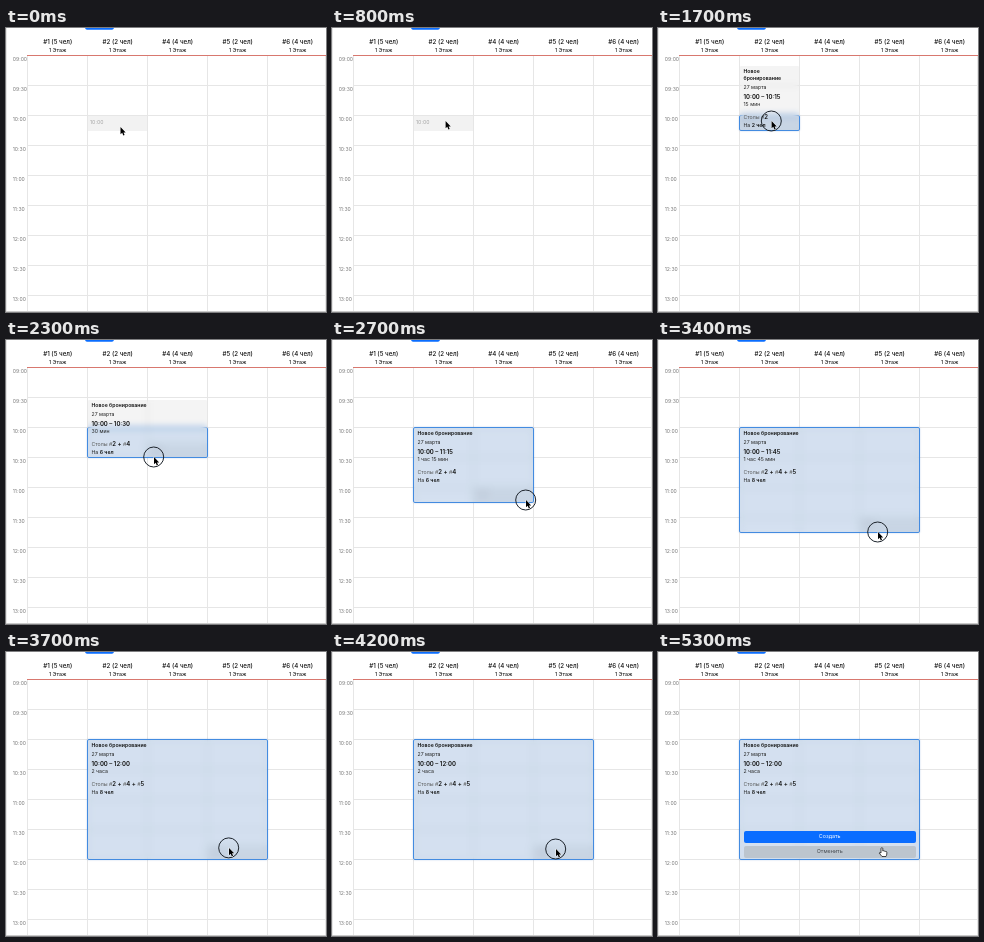
An HTML page that plays this animation: 320x284 px, repeating every 5900 ms.

```html
<!DOCTYPE html>
<html lang="ru">
<head>
<meta charset="utf-8">
<title>Бронирование столов</title>
<style>
  html, body { margin: 0; width: 100%; height: 100%; overflow: hidden; background: #fff; }
  body { position: relative; font: 5.2px Inter, Roboto, sans-serif; color: #222; }
  body > * { position: absolute; box-sizing: border-box; }
  svg { left: 0; top: 0; width: 320px; height: 284px; }
  b { font-weight: 600; color: #111; }
  #slot { width: 59px; height: 15px; padding: 2px 2px; line-height: 8px; background: rgba(0,0,0,.05); color: #a4a4a4; }
  #range { border: 1px solid #438be0; border-radius: 2px; background: rgba(0,105,220,.13);
    box-shadow: 0 0 1.5px rgba(0,80,180,.35); backdrop-filter: blur(3px); }
  #card { padding: 1.5px 3.5px 0; background: rgba(0,0,0,.045); border-radius: 1px; backdrop-filter: blur(3px); }
  #card div { white-space: nowrap; line-height: 9px; height: 9px; }
  #card .title { white-space: normal; line-height: 7px; height: auto; margin-bottom: 1px; font-weight: 600; color: #111; }
  #card .time { font-size: 6px; }
  #card .length { line-height: 7.5px; height: 11.5px; }
  #card .tables { color: #555; }
  #card .tables b { font-size: 6px; }
  .button { left: 85.5px; width: 172.5px; height: 11.5px; border-radius: 2px; text-align: center; line-height: 11.5px; font-size: 5.4px; }
  #create { top: 179.3px; background: #0a6dff; color: #fff; }
  #cancel { top: 194.3px; background: #bcc5ce; color: #454a50; }
</style>
</head>
<body>
<svg id="grid"></svg>
<div id="slot"></div>
<div id="range"></div>
<div id="card"></div>
<div id="create" class="button">Создать</div>
<div id="cancel" class="button">Отменить</div>
<svg>
  <g id="pointer">
    <circle id="press" cx="-.3" r="10" fill="none" stroke="#1c232b" stroke-width="1"/>
    <path d="M0 0V7.3L1.7 5.8 2.8 8.4 4.1 7.9 3 5.4H5.2Z" stroke="#fff" stroke-width=".8" paint-order="stroke"/>
  </g>
  <path id="hand" transform="translate(224 196)" fill="#fff" stroke="#111" stroke-width=".75" stroke-linejoin="round"
    d="M-1 .6Q-.9-.3-.1-.3T.8.6V3Q1.6 2.4 2.2 3.2 3 2.7 3.6 3.5 4.7 3.2 4.8 4.3V6Q4.7 7.3 4 8.5H0Q-1 7.3-2.8 5.1-2.7 3.9-1 5Z"/>
</svg>
<script>
const LOOP = 5900, STEP = 100, PRESS = 1700, RELEASE = 4800;
const LEFT = 21, COL = 60, TOP = 27, SLOT = 15, START = 87, CARD = 58;
const tables = [[1, 5], [2, 2], [4, 4], [5, 2], [6, 4]];
// time, x, y
const path = [
  [0, 114.5, 99], [600, 113.6, 93], [2000, 113.6, 93], [2100, 121, 98], [2300, 148, 117],
  [2600, 187, 149.8], [2700, 194, 160], [3000, 208, 178], [3200, 215, 187], [3400, 220, 192],
  [3600, 222.5, 195.2], [3800, 223.5, 196.6], [4200, 224, 197], [LOOP, 224, 197]
];
const $ = id => document.getElementById(id);
const show = (id, on) => { $(id).style.visibility = on ? 'visible' : 'hidden'; };
const place = (id, box) => {
  for (const key in box) $(id).style[key] = box[key] + 'px';
};
const clock = y => {
  const minutes = 540 + y - TOP;
  return String(Math.floor(minutes / 60)).padStart(2, '0') + ':' + String(minutes % 60).padStart(2, '0');
};

function drawGrid() {
  const line = (x, y, w, h, color) => `<rect x="${x}" y="${y}" width="${w}" height="${h}" fill="${color}"/>`;
  const text = (x, y, size, color, value, more = '') =>
    `<text x="${x}" y="${y}" font-size="${size}" fill="${color}" ${more}>${value}</text>`;
  let out = line(0, 0, 1, 284, '#e6e6e6') + line(319, 28, 1, 256, '#e6e6e6');
  for (let i = 0; i < 9; i++) {
    const y = TOP + i * 30;
    if (i) out += line(LEFT, y, 299, 1, '#e6e6e6');
    out += text(6.8, y + 6, 5.1, '#777', clock(y));
  }
  tables.forEach(([number, seats], i) => {
    const x = LEFT + i * COL, middle = x + 30.7;
    out += line(x, TOP, 1, 257, '#e6e6e6');
    out += text(middle, 15.8, 6.2, '#111', `#${number} (${seats} чел)`, 'text-anchor="middle" font-weight="500"');
    out += text(middle, 24, 5.3, '#222', '1 Этаж', 'text-anchor="middle" font-weight="500"');
  });
  out += line(LEFT, TOP, 299, 1, '#d8786f') + line(0, 283, 320, 1, '#c9c9c9');
  out += '<path d="M79 0H108Q107.5 1.7 106 1.7H81Q79.5 1.7 79 0Z" fill="#0a6dff"/>';
  $('grid').innerHTML = out;
}

function pointerAt(t) {
  const i = path.findIndex(point => point[0] > t);
  const [t0, x0, y0] = path[i - 1], [t1, x1, y1] = path[i];
  const k = (t - t0) / (t1 - t0);
  return [x0 + (x1 - x0) * k, y0 + (y1 - y0) * k];
}

function duration(minutes) {
  const hours = Math.floor(minutes / 60), rest = minutes % 60;
  const parts = [];
  if (hours) parts.push(hours + (hours > 1 ? ' часа' : ' час'));
  if (rest) parts.push(rest + ' мин');
  return parts.join(' ');
}

let lastCard = '';
function drawBooking(column, end) {
  const chosen = tables.slice(1, column + 1);
  const width = chosen.length * COL + 1, height = end - START;
  const cardHeight = Math.max(height - 1, CARD + (column === 1 ? 7 : 0) - 1);
  place('range', { left: LEFT + COL, top: START, width, height: height + 1 });
  place('card', { left: LEFT + COL + 1, top: end - cardHeight, width: width - 2, height: cardHeight });
  const seats = chosen.reduce((sum, table) => sum + table[1], 0);
  const names = chosen.map(table => `#<b>${table[0]}</b>`).join(' <b>+</b> ');
  const html = `<div class="title">Новое бронирование</div><div>27 марта</div>
    <div class="time"><b>${clock(START)} – ${clock(end)}</b></div>
    <div class="length">${duration(height)}</div>
    <div class="tables">Столы ${names}</div><div>На <b>${seats} чел</b></div>`;
  if (html !== lastCard) $('card').innerHTML = lastCard = html;
}

function draw(time) {
  const t = Math.floor(time % LOOP / STEP) * STEP;
  const [x, y] = pointerAt(t);
  const column = Math.floor((x - LEFT) / COL);
  const slotTop = TOP + Math.floor((y - 3 - TOP) / SLOT) * SLOT;
  const booking = t >= PRESS, done = t >= RELEASE;

  place('slot', { left: LEFT + column * COL + 1, top: slotTop + 1 });
  $('slot').textContent = clock(slotTop);
  show('slot', !done);
  show('range', booking);
  show('card', booking);
  if (booking) drawBooking(column, slotTop + SLOT);

  const fade = Math.max(0, Math.min(1, (t - RELEASE + STEP) / 300));
  $('create').style.opacity = $('cancel').style.opacity = fade;
  $('pointer').setAttribute('transform', `translate(${x} ${y})`);
  show('pointer', !done);
  show('press', booking && !done);
  show('hand', done);
}

drawGrid();
const begin = performance.now();
function tick() {
  draw(performance.now() - begin);
  requestAnimationFrame(tick);
}
tick();
</script>
</body>
</html>
```
